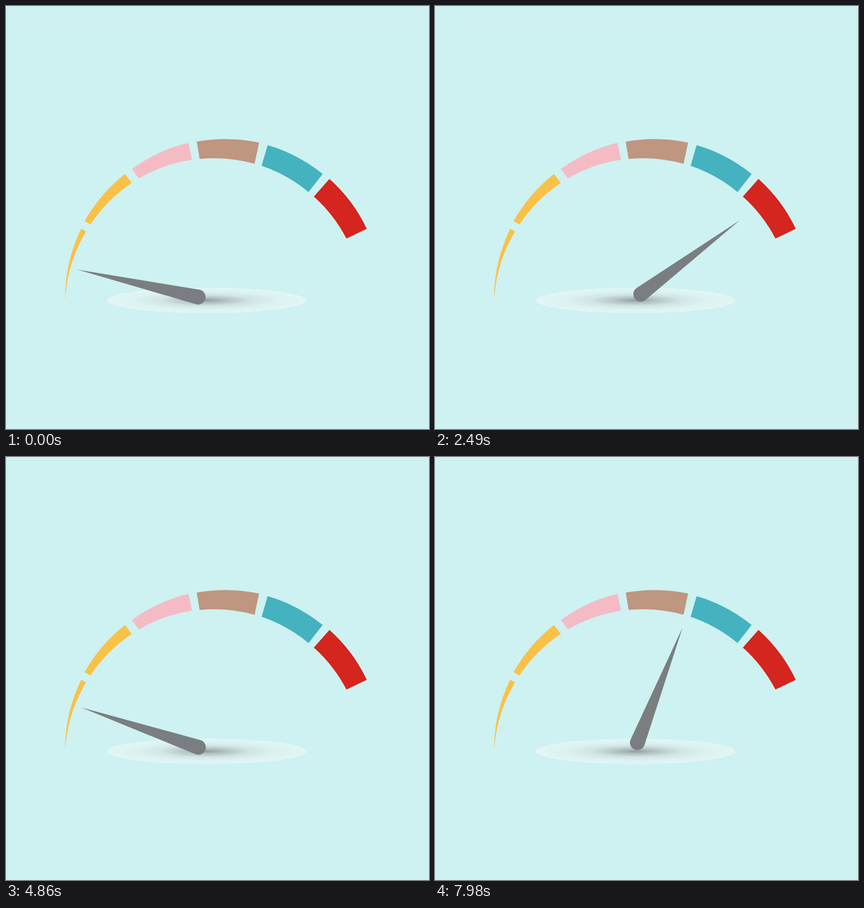
These frames come from a looping animation (748x748 px, 8 s). An HTML page:

```html
<!DOCTYPE html>
<html lang="en">
<head>
<meta charset="utf-8">
<title>Gauge</title>
<style>
  html, body { margin: 0; width: 100%; height: 100%; overflow: hidden; background: #cef1f1; }
  svg { display: block; width: 100%; height: 100%; }
</style>
</head>
<body>
<svg viewBox="0 0 748 748">
  <defs>
    <radialGradient id="shade">
      <stop offset="0" stop-color="#919e9d"/>
      <stop offset=".2" stop-color="#b4c3c3"/>
      <stop offset=".45" stop-color="#d1e5e5"/>
      <stop offset=".7" stop-color="#dcf1f1"/>
      <stop offset="1" stop-color="#e2f6f6"/>
    </radialGradient>
  </defs>
  <g id="dial"></g>
  <ellipse cx="354.5" cy="520.5" rx="176.5" ry="22.5" fill="url(#shade)"/>
  <path id="needle" fill="#7a7e80" d="M0-232L13.2-13.6A13.2 13.2 0 0 1-13.2-13.6Z"/>
</svg>
<script>
const OUTER = 280.7, INNER = 262.5;

// Colour, then outer start, outer end, inner end, inner start
const segments = [
  ['#f9c146', '104.5 517', '133 394', '141.5 398.7', '104.7 517'],
  ['#f9c146', '139 380.5', '210.5 297', '222.3 313', '149.3 386.3'],
  ['#f4bbc5', '222.7 288', '322.7 242', '329 271.7', '235 305'],
  ['#bf967f', '337.3 239.8', '447.6 241.6', '439.5 279', '342.4 270.5'],
  ['#45b2bf', '462.7 246', '560 297', '535 329', '452 282.5'],
  ['#d4251e', '572 305.8', '638 394', '602 411.2', '544.4 337']
];

document.getElementById('dial').innerHTML = segments.map(([color, a, b, c, d]) =>
  `<path fill="${color}" d="M${a}A${OUTER} ${OUTER} 0 0 1 ${b}L${c}A${INNER} ${INNER} 0 0 0 ${d}Z"/>`
).join('');

// Turning points of the swing: time in ms, angle from upright in degrees
const LOW = -77.2, HIGH = 60.7;
const swings = [[0, LOW], [2155, HIGH], [4533, LOW], [7137, HIGH], [9530, LOW]];
const LOOP = 8000, STEP = 30;

const needle = document.getElementById('needle');
const smooth = u => u * u * (3 - 2 * u);

function angleAt(time) {
  const i = swings.findIndex(([end]) => end > time);
  const [t0, a0] = swings[i - 1], [t1, a1] = swings[i];
  return a0 + (a1 - a0) * smooth((time - t0) / (t1 - t0));
}

function draw(time) {
  const angle = angleAt(Math.floor(time / STEP) * STEP);
  needle.setAttribute('transform', `translate(353 517.7) rotate(${angle})`);
}

let start;
function tick(now) {
  start ??= now;
  draw((now - start) % LOOP);
  requestAnimationFrame(tick);
}
draw(0);
requestAnimationFrame(tick);
</script>
</body>
</html>
```
